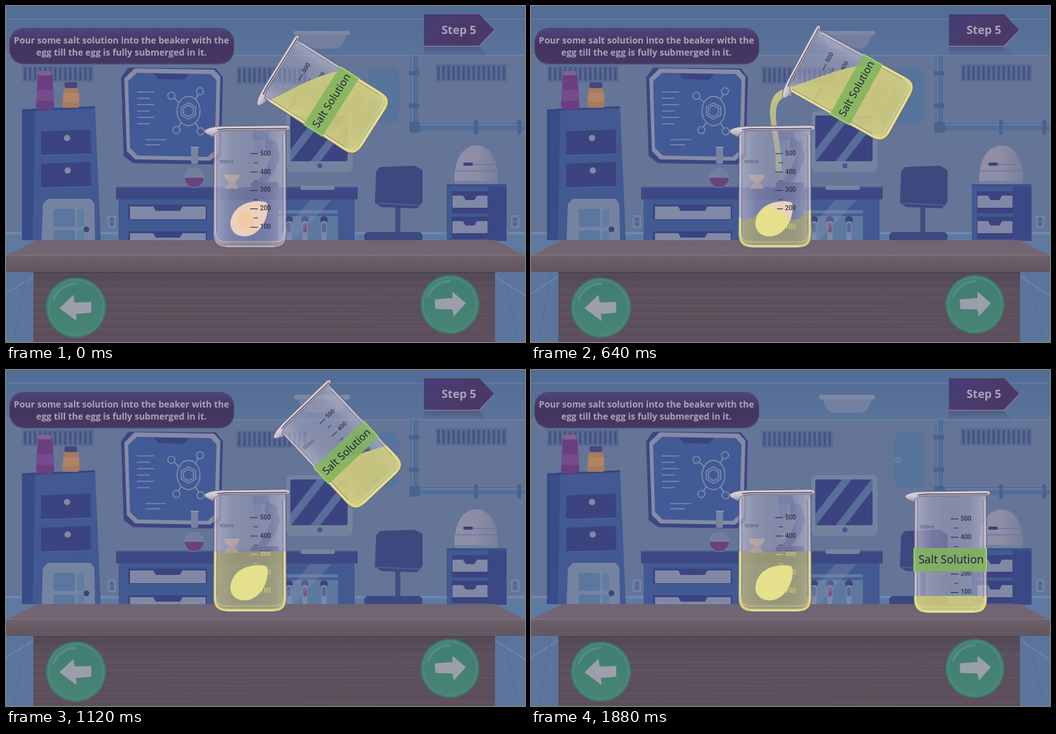
These frames come from a looping animation (816 by 528 pixels, 2 s). An HTML page with a canvas:

```html
<!DOCTYPE html>
<html lang="en">
<head>
<meta charset="utf-8">
<title>Salt solution and egg</title>
<style>
html, body { margin: 0; width: 100%; height: 100%; overflow: hidden; background: #647498; }
canvas { display: block; }
</style>
</head>
<body>
<canvas id="stage" width="816" height="528"></canvas>
<script>
const W = 816, H = 528, LOOP = 2000, STEP = 40;
const view = document.getElementById('stage').getContext('2d');
const room = document.createElement('canvas');
room.width = W;
room.height = H;
let c = room.getContext('2d');

// ---------- drawing helpers ----------
function rect(x, y, w, h, fill, r = 0) {
  c.beginPath();
  c.roundRect(x, y, w, h, r);
  c.fillStyle = fill;
  c.fill();
}
function poly(fill, ...p) {
  c.beginPath();
  for (let i = 0; i < p.length; i += 2) c.lineTo(p[i], p[i + 1]);
  c.closePath();
  c.fillStyle = fill;
  c.fill();
}
function line(color, width, ...p) {
  c.beginPath();
  for (let i = 0; i < p.length; i += 2) c.lineTo(p[i], p[i + 1]);
  c.strokeStyle = color;
  c.lineWidth = width;
  c.stroke();
}
function disc(x, y, r, fill) {
  c.beginPath();
  c.arc(x, y, r, 0, 7);
  c.fillStyle = fill;
  c.fill();
}
function ring(x, y, r, color, width) {
  c.beginPath();
  c.arc(x, y, r, 0, 7);
  c.strokeStyle = color;
  c.lineWidth = width;
  c.stroke();
}
function fade(x0, y0, x1, y1, ...colors) {
  const g = c.createLinearGradient(x0, y0, x1, y1);
  colors.forEach((k, i) => g.addColorStop(i / (colors.length - 1), k));
  return g;
}
function text(s, x, y, font, fill, align = 'center') {
  c.font = font;
  c.textAlign = align;
  c.fillStyle = fill;
  c.fillText(s, x, y);
}

// ---------- room ----------
const NAVY = '#3b4480', BLUE = '#425992', PALE = '#8588a2', FRONT = '#8088a6', PANE = '#5b769f';

function wall() {
  rect(0, 0, W, H, '#647598');
  rect(0, 0, W, 78, fade(0, 0, 0, 78, '#536c95', '#5a739a'));
  line('#607a9f', 2, 0, 21, W, 21);
  line('#6c80a2', 2, 0, 78, W, 78);
  rect(0, 355, W, 40, '#5f7aa1');
  line('#748aab', 3, 0, 357, W, 357);
  rect(0, 416, W, 112, '#5c759c');
  line('#6c86a9', 2, 0, 452, 43, 425);
  line('#6c86a9', 2, 769, 425, W, 455);
  line('#536c96', 1, 32, 418, 12, 528);
  line('#536c96', 1, 782, 418, 806, 528);
}

function vent(x, y, h) {
  rect(x, y, 113, h, '#5b6c92');
  for (let i = 0; i < 14; i++) rect(x + 3 + i * 7.9, y + 3, 4, h - 6, '#465585');
}

function pipes() {
  const pipe = '#536d97', joint = '#4a628e';
  rect(570, 97, 48, 88, '#58749a', 14);
  rect(574, 101, 40, 80, '#56749c', 11);
  ring(577, 142, 3.5, '#6d87a8', 2);
  rect(636, 78, 12, 112, pipe);
  line('#687f a2'.replace(' ', ''), 2, 639, 78, 639, 185);
  rect(640, 184, 176, 12, pipe);
  line('#687fa2', 2, 648, 187, W, 187);
  rect(634, 182, 17, 17, joint, 4);
  for (const y of [102, 153]) rect(633, y, 17, 7, joint, 2);
  for (const x of [736, 804]) rect(x, 179, 6, 23, joint, 2);
}

function lamp() {
  poly('#727f9e', 458, 45, 537, 45, 528, 63, 520, 67, 474, 67, 466, 63);
  rect(453, 39, 88, 7, '#7d87a3', 3);
}

function leftCabinet() {
  poly('#384c88', 25, 163, 47, 161, 44, 368, 25, 368);
  poly(BLUE, 46, 161, 140, 158, 149, 368, 42, 368);
  line('#35457f', 3, 25, 164, 140, 159);
  for (const y of [0, 51]) {
    poly(NAVY, 55, 197 + y, 133, 194 + y, 134, 232 + y, 55, 234 + y);
    line('#53699b', 1, 55, 235 + y, 134, 233 + y);
    disc(96 + y / 50, 207.5 + y, 5, PALE);
  }
  poly('#7583a1', 66, 303, 133, 303, 139, 311, 140, 368, 56, 368, 58, 311);
  for (const [y, h] of [[319, 28], [353, 15]]) {
    rect(75, y, 33, h, PANE, 2);
    rect(112, y, 11, h, '#627da3', 2);
  }
  disc(126.5, 351, 4.5, NAVY);
  // bottles
  poly('#693f82', 50, 108, 73, 108, 76, 158, 72, 163, 51, 163, 47, 158);
  rect(51, 102, 20, 7, '#85608f', 2);
  rect(48, 132, 27, 17, '#744c8b');
  poly('#a47a62', 91, 127, 113, 127, 116, 157, 113, 160, 90, 160, 88, 157);
  rect(92, 120, 20, 9, '#46477c', 2);
  rect(90, 137, 25, 14, '#b08462');
}

function screen() {
  const inner = '#425a95', ink = '#788bae';
  poly('#3c4681', 181, 112, 192, 97, 330, 98, 341, 112, 338, 237, 325, 249, 200, 247, 185, 236);
  poly('#868ba6', 186, 114, 202, 98, 327, 100, 337, 111, 334, 232, 321, 243, 203, 241, 190, 228);
  poly(inner, 192, 118, 206, 105, 322, 107, 331, 117, 328, 227, 317, 237, 207, 235, 195, 223);
  poly(NAVY, 232, 106, 288, 107, 280, 116, 240, 115);
  for (let i = 0; i < 6; i++) line(ink, 1.6, 206, 135 + i * 10, i % 2 ? 226 : 233, 135 + i * 10);
  line(ink, 1.6, 219, 210, 252, 210);
  line(ink, 1.6, 219, 218, 242, 218);
  for (const [x, y] of [[260, 141], [305, 134], [268, 195], [306, 197]]) {
    line(ink, 2, 287, 165, x, y);
    disc(x, y, 5.6, inner);
    ring(x, y, 5.6, ink, 1.8);
  }
  c.beginPath();
  c.ellipse(287, 165, 18, 23, 0, 0, 7);
  c.fillStyle = inner;
  c.fill();
  c.stroke();
  for (const r of [13, 9]) {
    c.beginPath();
    for (let i = 0; i < 6; i++) c.lineTo(287 + r * Math.sin(i * Math.PI / 3), 165 - r * Math.cos(i * Math.PI / 3));
    c.closePath();
    c.stroke();
  }
}

function drawer(x, y, w, h, notch) {
  const l = x + (w - notch) / 2, r = l + notch;
  poly(FRONT, x, y, l, y, l + 4, y + 7, r - 4, y + 7, r, y, x + w, y, x + w, y + h, x, y + h);
}

function bench() {
  rect(177, 303, 371, 66, BLUE);
  rect(173, 284, 380, 20, '#3c4984');
  line('#4c5e92', 1.5, 173, 285, 553, 285);
  for (const y of [315, 357]) {
    rect(192, y - 3, 124, 24, NAVY);
    drawer(195, y, 119, 20, 46);
  }
  rect(428, 321, 94, 48, '#5d799f');
  rect(428, 326, 94, 4, '#465b92');
  for (const [x, k] of [[445, '#516295'], [470, '#79527f'], [500, '#556798']]) {
    disc(x, 336, 6, NAVY);
    rect(x - 4, 338, 8, 30, '#7a8aa8', 3);
    rect(x - 3, 341, 6, 15, k, 3);
  }
  poly('rgba(130,143,175,.35)', 478, 305, 512, 305, 452, 368, 424, 368);
  // flask
  rect(291, 222, 11, 26, '#7882a2', 2);
  disc(296, 270, 16, '#737e9f');
  c.beginPath();
  c.arc(296, 270, 15, 0, Math.PI);
  c.fillStyle = '#69427d';
  c.fill();
  line('#9a9cb2', 1.5, 290, 222, 303, 222);
  // cup
  c.beginPath();
  c.arc(355, 265, 12, 0, Math.PI);
  c.fillStyle = '#b39a84';
  c.fill();
  poly('#a08d88', 351, 276, 359, 276, 366, 287, 344, 287);
  // microscope
  poly('#4e5f95', 388, 197, 412, 197, 414, 210, 389, 211);
  poly('#44548d', 409, 206, 425, 214, 431, 238, 422, 260, 404, 284, 390, 284, 410, 253, 417, 235, 406, 222);
  poly('#58699a', 389, 212, 403, 211, 404, 230, 392, 232);
  rect(385, 277, 44, 9, NAVY, 3);
  // monitor
  rect(477, 260, 34, 24, '#677496');
  rect(463, 282, 54, 7, '#7983a1', 3);
  rect(441, 165, 104, 96, '#7482a0', 8);
  rect(447, 172, 90, 72, NAVY, 3);
  c.save();
  c.beginPath();
  c.rect(447, 172, 90, 72);
  c.clip();
  for (const x of [489, 535]) poly('#586d99', x, 172, x + 15, 172, x - 41, 244, x - 56, 244);
  c.restore();
  disc(493.5, 251, 4, BLUE);
}

function rightSide() {
  // chair
  rect(612, 316, 8, 42, '#414d82');
  poly('#3d487f', 588, 253, 643, 251, 655, 258, 655, 308, 646, 318, 590, 316, 580, 309, 582, 260);
  rect(563, 355, 92, 16, '#3d487f', 7);
  line('#4d5f95', 2, 584, 310, 652, 313);
  // dome
  c.beginPath();
  c.moveTo(705, 276);
  c.bezierCurveTo(704, 240, 719, 219, 740, 219);
  c.bezierCurveTo(762, 219, 774, 244, 774, 276);
  c.closePath();
  c.fillStyle = fade(705, 0, 774, 0, '#8f90a8', '#8d8da5', '#777e9d');
  c.fill();
  rect(706, 275, 67, 10, '#747f9f', 4);
  rect(719, 246, 15, 5, NAVY, 2);
  line('#6c779a', 1.5, 734, 249, 772, 249);
  line('#6c779a', 1.5, 706, 259, 773, 259);
  // cabinet
  rect(693, 280, 94, 89, BLUE);
  rect(758, 280, 29, 89, '#3a4985');
  rect(693, 280, 94, 4, '#3e518c');
  for (const y of [291, 331]) {
    rect(701, y, 57, 35, NAVY);
    drawer(702, y + 7, 55, 19, 22);
  }
}

function socket(x) {
  rect(x, 329, 13, 20, '#7487a7', 2);
  rect(x + 2, 331, 9, 16, '#5e769d', 2);
  for (const y of [335.5, 342.5]) disc(x + 6.5, y, 2, '#495c8f');
}

function table() {
  poly(fade(0, 368, 0, 392, '#706677', '#766976'), 48, 368, 770, 368, W, 392, 0, 392);
  rect(0, 392, W, 26, fade(0, 392, 0, 418, '#6c606b', '#625661'));
  line('#7e707a', 1.5, 0, 392, W, 392);
  rect(43, 418, 726, 110, fade(0, 418, 0, 446, '#514956', '#5e505c'));
  for (let i = 0; i < 26; i++) {
    const y = 422 + i * 4.1;
    line(i % 3 ? 'rgba(72,60,75,.28)' : 'rgba(112,96,106,.3)', 1, 43, y, 769, y + Math.sin(i * 2.3) * 2);
  }
  for (let i = 0; i < 9; i++) line('rgba(98,85,100,.25)', 1, 48 - i * 5, 370 + i * 2.5, 768 + i * 5, 370 + i * 2.5);
  line('#4b4450', 2, 43, 419, 769, 419);
}

function button(x, y, r, ...arrow) {
  disc(x, y, r, '#3b756d');
  disc(x, y, r - 2, '#4a8679');
  disc(x, y, r - 6, fade(0, y - r, 0, y + r, '#407d72', '#488575'));
  c.beginPath();
  c.arc(x, y, r - 10, 3.5, 4.7);
  c.strokeStyle = 'rgba(125,175,165,.3)';
  c.lineWidth = 4;
  c.lineCap = 'round';
  c.stroke();
  c.lineCap = 'butt';
  poly('#9c9eac', ...arrow);
}

function titles() {
  const font = '"Open Sans", sans-serif', ink = '#a8a4b8';
  rect(5, 34, 354, 58, '#55537a', 23);
  rect(6, 35, 352, 55.5, fade(0, 34, 0, 92, '#4e4678', '#43345f', '#473863'), 22);
  text('Pour some salt solution into the beaker with the', 181.5, 59, 'bold 14px ' + font, ink);
  text('egg till the egg is fully submerged in it.', 181.5, 78, 'bold 14px ' + font, ink);
  poly(fade(0, 64, 0, 80, 'rgba(72,72,115,.5)', 'rgba(72,72,115,0)'), 657, 64, 744, 64, 758, 80, 657, 80);
  poly(fade(657, 13, 700, 63, '#433d70', '#4a3c71', '#4a3967'), 657, 13, 744, 13, 768, 38, 744, 63, 657, 63);
  line('#8480a0', 1.5, 657, 63.3, 744, 63.3, 768, 38);
  text('Step 5', 712, 44, 'bold 18px ' + font, ink);
}

wall();
vent(25, 93, 27);
vent(362, 95, 28);
vent(675, 91, 28);
pipes();
lamp();
leftCabinet();
screen();
bench();
rightSide();
socket(160);
socket(794);
table();
button(110, 474, 47.5, 84, 475, 106, 454, 108, 466, 134, 465, 134, 482, 110, 484, 111, 495);
button(698, 469, 46.5, 723, 467, 702, 449, 702, 459, 674, 461, 675, 476, 702, 477, 704, 488);
titles();

// ---------- motion ----------
const ramp = (t, a, b) => Math.min(1, Math.max(0, (t - a) / (b - a)));
const mix = (a, b, k) => a + (b - a) * k;

// The pouring beaker rises while tipping, then swings back down to the table.
function pose(t) {
  const lift = ramp(t, 0, 960), back = ramp(t, 1060, 1440);
  return {
    x: mix(511.5, 660, back),
    y: mix(149 - 28 * lift, 296, back ** 1.7) + 2 * ramp(t, 1440, 1880),
    tilt: (57.6 + 3.4 * ramp(t, 0, 600)) * (1 - back) ** 2,
    scale: mix(.945, 1, ramp(t, 1280, 1440))
  };
}

// Surface heights, measured from the beaker's label centre.
function pourSurface(t, tilt) {
  const left = 1 - ramp(t, 0, 960) ** 3;
  const up = t < 1060 ? 0 : 1 - tilt / 61;
  const level = mix(-15 - 17 * left, 57, Math.min(1, up * 1.2));
  const slope = -.28 * left - .4 * Math.sin(Math.PI * up);
  const ripple = 3 * ramp(t, 1300, 1440) * (1 - ramp(t, 1440, 1700));
  return x => level + slope * x - 12 * left * Math.cos(x / 50) - ripple * Math.cos(x / 18);
}

function fillSurface(t) {
  const full = 1 - (1 - ramp(t, 420, 940)) ** 1.6;
  const wave = 11 * Math.sin(Math.PI * full);
  return x => mix(86, -11, full) - wave * Math.cos((x + 8) / 12);
}

// ---------- beakers ----------
function bodyPath() {
  c.beginPath();
  c.moveTo(327, 196);
  c.lineTo(326, 358);
  c.bezierCurveTo(326, 374, 334, 380, 350, 380);
  c.lineTo(418, 380);
  c.bezierCurveTo(434, 380, 441, 374, 441, 358);
  c.lineTo(440, 194);
  c.closePath();
}

function egg(fill) {
  c.beginPath();
  c.moveTo(410, 309);
  c.bezierCurveTo(397, 304, 374, 308, 363, 319);
  c.bezierCurveTo(347, 335, 349, 362, 376, 362);
  c.bezierCurveTo(401, 361, 416, 328, 410, 309);
  c.fillStyle = fill;
  c.fill();
}

function marks(ink) {
  for (let i = 0; i < 5; i++) {
    const y = 232 + i * 28.9;
    line(ink, 1.2, 384, y, 396, y);
    if (i < 4) line(ink, 1.1, 389.5, y + 14.4, 396, y + 14.4);
    text(500 - i * 100, 399.5, y + 2.6, '500 10px Roboto, sans-serif', ink, 'left');
  }
}

function rim() {
  c.beginPath();
  c.moveTo(312, 196);
  c.bezierCurveTo(318, 190, 330, 189, 345, 189);
  c.lineTo(441, 187.5);
  c.bezierCurveTo(448, 188, 448, 194, 441, 195);
  c.lineTo(345, 195.5);
  c.bezierCurveTo(332, 196, 328, 199, 326, 206);
  c.bezierCurveTo(321, 203, 312, 201, 312, 196);
  c.fillStyle = fade(0, 187, 0, 204, '#bdb8c6', '#d0ccd7', '#a09bb0');
  c.fill();
  c.strokeStyle = '#6b647c';
  c.lineWidth = 1;
  c.stroke();
  line('#55485e', 1.5, 332, 194.5, 345, 193, 442, 192.5);
  line('#e2dfe8', 1, 320, 193.5, 340, 190.8, 440, 189.8);
}

function basePath(color) {
  c.beginPath();
  c.moveTo(329, 358);
  c.bezierCurveTo(331, 370, 340, 371, 352, 371);
  c.lineTo(416, 371);
  c.bezierCurveTo(430, 371, 437, 369, 438, 358);
  c.strokeStyle = color;
  c.lineWidth = 1.2;
  c.stroke();
}

function beaker({ x, y, tilt, scale }, surface, { withEgg, liquid, label }) {
  const a = tilt * Math.PI / 180;
  c.save();
  c.translate(x, y);
  c.rotate(-a);
  c.scale(scale, scale);
  c.translate(-384, -296);

  bodyPath();
  c.fillStyle = fade(326, 0, 441, 0, 'rgba(200,194,210,.7)', 'rgba(180,175,194,.48)',
    'rgba(172,168,192,.42)', 'rgba(176,172,194,.46)', 'rgba(200,194,210,.66)');
  c.fill();
  if (withEgg) {
    egg('#ecd0bb');
    disc(377, 337, 12.5, '#f0c8a4');
  }
  marks('#30324c');
  text('500ml', 346.5, 247, '8px Roboto, sans-serif', '#50526f');

  // the surface stays in stage space while the glass tilts
  c.save();
  bodyPath();
  c.clip();
  c.save();
  c.translate(384, 296);
  c.scale(1 / scale, 1 / scale);
  c.rotate(a);
  c.beginPath();
  for (let i = -132; i <= 132; i += 4) c.lineTo(i, surface(i));
  c.lineTo(132, 220);
  c.lineTo(-132, 220);
  c.closePath();
  c.restore();
  c.clip();
  rect(300, 180, 160, 210, liquid);
  marks('#d9d583');
  if (withEgg) egg('#e5e08c');
  bodyPath();
  c.strokeStyle = 'rgba(230,225,125,.75)';
  c.lineWidth = 9;
  c.stroke();
  c.restore();

  // glass edges and shine
  bodyPath();
  c.strokeStyle = 'rgba(88,80,108,.8)';
  c.lineWidth = 1.2;
  c.stroke();
  for (const [edge, dir] of [[326.5, 1], [440.5, -1]]) {
    line('rgba(228,224,236,.55)', 1.6, edge + 3 * dir, 202, edge + 2.5 * dir, 358);
    line('rgba(86,80,112,.45)', 1, edge + 5.5 * dir, 202, edge + 5 * dir, 356);
  }
  basePath('rgba(225,222,225,.5)');
  line('rgba(240,238,240,.55)', 1.5, 345, 377.5, 422, 377.5);

  if (label) {
    rect(325.5, 278, 115.5, 37, 'rgba(130,180,94,.88)');
    for (const edge of [326.5, 440]) line('rgba(165,220,120,.8)', 2, edge, 278, edge, 315);
    text(label, 384.5, 302, '17.5px "Noto Sans", "Open Sans", sans-serif', '#20243a');
  }
  rim();
  c.restore();
}

function stream(t) {
  const head = mix(140, 262, ramp(t, 160, 400) ** 2);
  const tail = mix(124, 262, ramp(t, 740, 900));
  if (t < 160 || head <= tail) return;
  const early = 1 - ramp(t, 280, 440);
  c.save();
  c.beginPath();
  c.rect(360, tail, 60, head - tail);
  c.clip();
  c.translate(7 * early, 5 * early - 8 * ramp(t, 640, 860));
  c.beginPath();
  c.moveTo(408, 131);
  c.bezierCurveTo(388, 128, 374, 143, 376, 172);
  c.bezierCurveTo(378, 200, 387, 222, 384, 270);
  c.lineTo(394, 270);
  c.bezierCurveTo(396, 225, 386, 200, 385, 172);
  c.bezierCurveTo(385, 153, 391, 142, 409, 141);
  c.closePath();
  c.fillStyle = fade(0, 130, 0, 268, 'rgba(214,211,128,.85)', 'rgba(200,198,130,.8)', 'rgba(200,200,125,.5)');
  c.fill();
  c.restore();
}

const GLASS = { x: 384, y: 296, tilt: 0, scale: 1 };

function draw(t) {
  const held = pose(t);
  c = view;
  c.drawImage(room, 0, 0);
  stream(t);
  beaker(GLASS, fillSurface(t), { withEgg: true, liquid: 'rgba(178,173,96,.58)' });
  beaker(held, pourSurface(t, held.tilt), { label: 'Salt Solution', liquid: 'rgba(222,217,112,.72)' });
}

const start = performance.now();
function tick() {
  const t = (performance.now() - start) % LOOP;
  draw(Math.floor(t / STEP) * STEP);
  requestAnimationFrame(tick);
}
tick();
</script>
</body>
</html>
```
